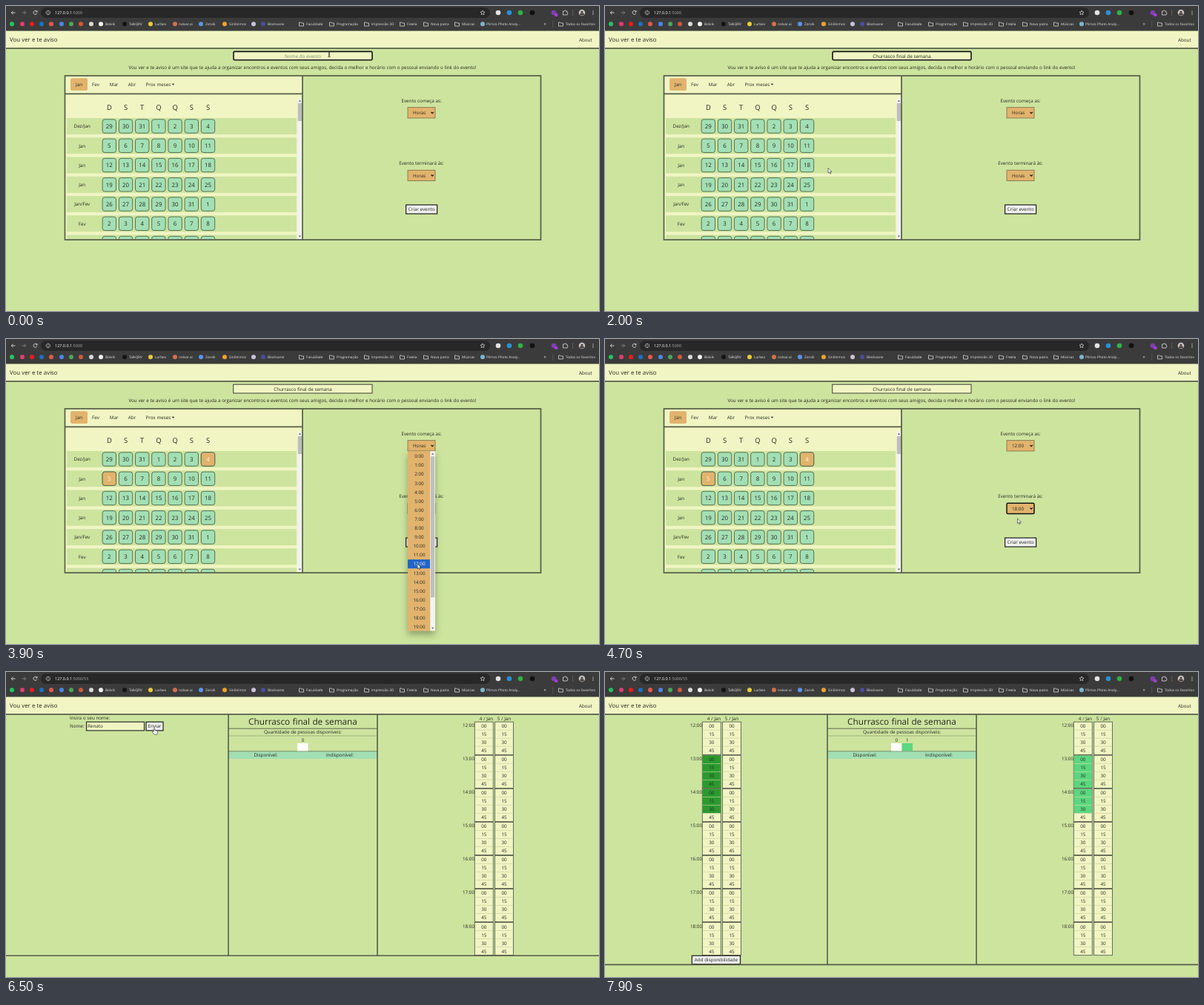
An HTML page that plays this animation: 800 px wide and 411 px high, repeating every 8 s.

```html
<!DOCTYPE html>
<html lang="pt">
<head>
<meta charset="utf-8">
<title>Vou ver e te aviso</title>
<style>
  html, body { margin: 0; width: 100%; height: 100%; overflow: hidden; background: #cde49f; }
  svg { display: block; width: 100vw; height: 100vh; }
  text { font-family: "Open Sans", "Noto Sans", sans-serif; word-spacing: .02em; text-rendering: geometricPrecision; white-space: pre; }
</style>
</head>
<body>
<svg id="stage" viewBox="0 0 800 411" xmlns="http://www.w3.org/2000/svg">
  <defs>
    <clipPath id="calendarClip"><rect x="80" y="119" width="320" height="195.5"/></clipPath>
    <filter id="shadow" x="-60%" y="-20%" width="220%" height="140%">
      <feDropShadow dx="0" dy="5" stdDeviation="5" flood-color="#3a4a20" flood-opacity=".45"/>
    </filter>
  </defs>
</svg>
<script>
const LOOP = 8000;
const CREAM = '#f0f5c3', ORANGE = '#e2b36d', MINT = '#a3dfb4', LINE = '#555d46', INK = '#25291f';
const EVENT = 'Churrasco final de semana', PERSON = 'Renato';
const stage = document.getElementById('stage');

// ---------- drawing helpers ----------
const rect = (x, y, w, h, fill, extra = '') =>
  `<rect x="${x}" y="${y}" width="${w}" height="${h}" fill="${fill}" ${extra}/>`;
const circle = (x, y, r, fill) => `<circle cx="${x}" cy="${y}" r="${r}" fill="${fill}"/>`;
const path = (d, stroke, width = 1, extra = '') =>
  `<path d="${d}" fill="none" stroke="${stroke}" stroke-width="${width}" ${extra}/>`;
const text = (x, y, s, { size = 6.67, fill = INK, anchor = 'start' } = {}) =>
  `<text x="${x}" y="${y}" font-size="${(size * .94).toFixed(2)}" fill="${fill}" text-anchor="${anchor}">${s}</text>`;
const mid = (x, y, s, style = {}) => text(x, y, s, { anchor: 'middle', ...style });
const outline = (color, width = 1, r = 0) => `stroke="${color}" stroke-width="${width}" rx="${r}"`;
const times = (n, f) => Array.from({ length: n }, (_, i) => f(i)).join('');

function group(content = '', parent = stage, attrs = '') {
  const g = document.createElementNS('http://www.w3.org/2000/svg', 'g');
  g.innerHTML = attrs ? `<g ${attrs}>${content}</g>` : content;
  parent.appendChild(g);
  return g;
}
const show = (g, on) => { g.style.display = on ? '' : 'none'; };
const setText = (g, s) => {
  const node = g.querySelector('text');
  if (node.textContent !== s) node.textContent = s;
};

// ---------- browser bars ----------
const folder = x => path(`M${x - 3} 22h2l1 1h3v4h-6z`, '#d5d5d5', .8);
const label = (x, s) => text(x, 26.2, s, { size: 5, fill: '#e6e6e6' });

function browser() {
  const icons = [[8, '#25c45e'], [22, '#e23c74'], [35, '#f01c1c'], [48, '#1b73c0'], [61, '#e35a48'],
    [75, '#4b87e8'], [88, '#4ca65a'], [101, '#cf5a3c'], [115, '#dadada'], [128, '#f2f2f2'], [160, '#141414'],
    [195, '#e6cc3c'], [228, '#d6704c'], [263, '#5c93ee'], [295, '#f0a22e'], [334, '#c9c2d8'], [347, '#4a4d9a'], [643, '#7bb6cf']];
  const links = [[134, 'Bolvik'], [166, 'TalkQRV'], [201, 'Lurbex'], [233, 'nolvar.ai'], [269, 'Zorvik'],
    [301, 'Sinônimos'], [353, 'Blockvane'], [648, 'Plimzo Photo Analy...']];
  const folders = [[405, 'Faculdade'], [446, 'Programação'], [493, 'Impressão 3D'], [541, 'Freela'],
    [573, 'Nova pasta'], [615, 'Músicas'], [755, 'Todos os favoritos']];
  const tools = [[664, '#e4e4e4'], [679, '#2b8fd6'], [694, '#2fb344'], [710, '#111'], [739, '#7d3fb0']];
  const grey = '#dcdcdc';
  return rect(0, 0, 800, 33.5, '#3b3b3b') + rect(47, 2, 606, 14, '#282828', 'rx="7"')
    + path('M12.5 9h-5m2-2.2l-2.3 2.2l2.3 2.2', grey, .9)
    + path('M21.5 9h5m-2-2.2l2.3 2.2l-2.3 2.2', '#858585', .9)
    + path('M41.6 7.4a2.5 2.5 0 1 0 .3 2.4M42 6v2h-2', grey, .9)
    + path('M56.8 6.3a2.7 2.7 0 1 0 .1 0M56.8 8.4v2.3M56.8 7.2v.7', grey, .7)
    + path('M643 6l.9 2 2.1.2-1.6 1.4.5 2.1-1.9-1.1-1.9 1.1.5-2.1-1.6-1.4 2.1-.2z', grey, .7)
    + tools.map(([x, c]) => circle(x, 9, 3.3, c)).join('') + rect(740, 10, 4.5, 4, '#a13dd0', 'rx="1"')
    + path('M751.5 7h2a1 1 0 0 1 2 0h1.5v2a1 1 0 0 1 0 2v1h-5.5z', grey, .8)
    + rect(764.5, 5, .6, 8, '#777') + circle(777, 9, 4.3, '#c9c5c0') + circle(777, 8, 1.5, '#483f3d')
    + rect(774.2, 9.6, 5.6, 3, '#483f3d', 'rx="1.4"')
    + times(3, i => circle(792, 6.8 + i * 2.2, .65, grey))
    + icons.map(([x, c]) => circle(x, 24.3, 3, c)).join('')
    + links.map(([x, s]) => label(x, s)).join('')
    + folders.map(([x, s]) => folder(x - 6.5) + label(x, s)).join('')
    + text(725.5, 26.3, '»', { size: 7, fill: grey }) + rect(737.5, 20, .6, 9, '#666');
}

function siteHeader() {
  return rect(0, 33.5, 800, 23, CREAM) + rect(0, 56.2, 800, 1.7, LINE)
    + text(5, 48.2, 'Vou ver e te aviso', { size: 8.33 }) + text(773, 47.5, 'About');
}

const button = (x, y, w, h, s) =>
  rect(x, y, w, h, '#f0f0f0', outline('#1d1d1d', 1.2)) + mid(x + w / 2, y + h / 2 + 2.3, s);

// ---------- first page: event form ----------
const dayX = i => 139.3 + 22.2 * i, weekY = i => 162 + 26.25 * i;
const dayCell = (col, row, day, fill = MINT, ink = INK) =>
  rect(dayX(col) - 9.2, weekY(row) - 9.2, 18.4, 18.4, fill, outline('#4d6650', .9, 3))
  + mid(dayX(col), weekY(row) + 2.9, day, { size: 8.33, fill: ink });

function calendar() {
  const labels = ['Dez/Jan', 'Jan', 'Jan', 'Jan', 'Jan/Fev', 'Fev', 'Fev'];
  const weeks = labels.map((s, row) => rect(82, weekY(row) - 11, 310, 22, '#cde49f')
    + mid(102.7, weekY(row) + 2.3, s)
    + times(7, col => dayCell(col, row, new Date(2024, 11, 29 + row * 7 + col).getDate()))).join('');
  return rect(80, 94, 320, 221, CREAM)
    + rect(87, 97.3, 23, 16.8, ORANGE, 'rx="2.5"')
    + [[98.5, 'Jan'], [121, 'Fev'], [145.7, 'Mar'], [170, 'Abr']].map(([x, s]) => mid(x, 108.4, s)).join('')
    + text(188.5, 108.4, 'Prox meses') + `<path d="M223.5 104.8h3.8l-1.9 2z" fill="${INK}"/>`
    + [...'DSTQQSS'].map((s, i) => mid(dayX(i), 139.6, s, { size: 10 })).join('')
    + `<g clip-path="url(#calendarClip)">${weeks}</g>`
    + rect(393.3, 124.5, 6.2, 190, '#f1f1f1') + rect(393.8, 131, 5.2, 24, '#bdbdbd')
    + `<path d="M394.8 128.8h3.2l-1.6-2zM394.8 309.4h3.2l-1.6 2z" fill="#555"/>`;
}

function formPage() {
  const frame = outline(LINE, 1.7);
  return mid(400, 85.2, 'Vou ver e te aviso é um site que te ajuda a organizar encontros e eventos com seus amigos, decida o melhor e horário com o pessoal enviando o link do evento!')
    + calendar() + rect(79.5, 94, 642, 221, 'none', frame)
    + path('M400 94V315M79.5 118.3H400', LINE, 1.7)
    + mid(560.5, 129.9, 'Evento começa as:') + mid(560.5, 214.4, 'Evento terminará às:')
    + button(539.6, 268, 42, 12, 'Criar evento');
}

const select = y => rect(542, y, 37, 14.3, ORANGE, outline('#7b6b45', .8))
  + text(549, y + 9.6, 'Horas') + path(`M573.4 ${y + 6.2}l1.7 1.8l1.7-1.8`, '#111', 1.1);

const ITEM = 12.1, POPUP_HEIGHT = 242;
function popup(top) {
  const g = group('', form);
  const box = group(rect(542, top, 37, POPUP_HEIGHT, ORANGE), g, 'filter="url(#shadow)"');
  const mark = group(rect(542, 0, 30, ITEM, '#2365c4'), g);
  const items = group(times(20, i => mid(557.5, top + .7 + (i + .5) * ITEM + 2.3, i + ':00')), g);
  group(rect(572.3, top, 6.7, POPUP_HEIGHT, '#f4f4f4') + rect(573, top + 7, 5.2, 190, '#bfbfbf')
    + `<path d="M574 ${top + 4.5}h3.2l-1.6-2zM574 ${top + 237.5}h3.2l-1.6 2z" fill="#555"/>`, g);
  return {
    update(open, y) {
      show(g, open);
      if (!open) return;
      const hover = Math.floor((y - top - .7) / ITEM);
      show(mark, hover >= 0 && hover < 20);
      mark.setAttribute('transform', `translate(0 ${top + .7 + hover * ITEM})`);
      items.querySelectorAll('text').forEach((n, i) => n.setAttribute('fill', i === hover ? '#fff' : INK));
    }
  };
}

// ---------- second page: availability ----------
const HOUR = 45.05;
const slotY = n => 67.2 + Math.floor(n / 4) * HOUR + (n % 4) * 11;
const slotLabel = n => ['00', '15', '30', '45'][n % 4];

function timetable(x) {
  const column = (cx, h) => {
    const top = 67.2 + h * HOUR;
    return rect(cx, top, 25, 44.2, CREAM, outline('#5a5f50', .9))
      + times(3, i => path(`M${cx} ${top + 11 * (i + 1)}h25`, '#8d9579', .5, 'stroke-dasharray="1 1"'))
      + times(4, i => mid(cx + 12.5, top + 11 * i + 8, slotLabel(i)));
  };
  return mid(x + 16, 64.5, '4 / Jan') + mid(x + 40, 64.5, '5 / Jan')
    + times(7, h => text(x, 74.2 + h * HOUR, 12 + h + ':00', { anchor: 'end' })
      + column(x + .3, h) + column(x + 27.5, h));
}

const filledSlot = (x, n, fill) => rect(x + .7, slotY(n) + .3, 24.2, 10.5, fill)
  + mid(x + 12.8, slotY(n) + 8, slotLabel(n));

function summary() {
  const dotted = 'stroke-dasharray="1 .8"';
  return mid(400.5, 71, EVENT, { size: 12.5 }) + mid(400.5, 83.4, 'Quantidade de pessoas disponíveis:')
    + path('M300 76.2H501', LINE, .9) + path('M300 86H501', LINE, .7, dotted)
    + rect(300, 107, 201, 10, MINT) + path('M300 106.8H501', LINE, .7)
    + mid(350.5, 114.3, 'Disponível:') + mid(450.5, 114.3, 'Indisponível:');
}
const pageLines = bottom => path(`M300 57V${bottom}M501 57V${bottom}M0 ${bottom}H800`, LINE, 1.6);

// ---------- scene ----------
group(rect(0, 0, 800, 411, '#cde49f') + siteHeader());

const form = group(formPage());
const titleFocus = group(rect(307, 61.4, 187, 11.4, CREAM, outline('#151515', 1.6, 1.5)), form);
const titlePlain = group(rect(306.7, 61.2, 187.3, 11.8, CREAM, outline('#3e4138', 1)), form);
const titleText = group(mid(400.5, 69.6, ''), form);
const startSelect = group(select(136.7), form);
const endSelect = group(select(221.2), form);
const day4 = group(dayCell(6, 0, 4, ORANGE, '#fff8e4'), form);
const day5 = group(dayCell(0, 1, 5, ORANGE, '#fff8e4'), form);

const event = group(summary() + timetable(632));
const nameForm = group(text(86, 64.4, 'Insira o seu nome:') + text(86, 75.4, 'Nome:')
  + rect(108.5, 67.3, 78, 11.6, CREAM, outline('#30332b', 1.2))
  + button(189, 67.3, 23, 11.6, 'Enviar') + pageLines(382.3), event);
const nameText = group(text(110, 75.4, ''), event);
const ownTable = group(timetable(131) + button(117.3, 382.3, 65.2, 11.4, 'Add disponibilidade') + pageLines(394.4), event);
const ownSlots = Array.from({ length: 7 }, (_, i) => group(filledSlot(131, i + 4, '#2b9a2f'), event));
const legendEmpty = group(mid(400.5, 93.8, '0') + rect(393, 96, 14.5, 10.4, '#fff'), event);
const legendOne = group(mid(393.2, 93.8, '0') + mid(407.8, 93.8, '1')
  + rect(386, 96, 14.5, 10.4, '#fff') + rect(400.5, 96, 14.5, 10.4, '#5cd67f')
  + times(7, i => filledSlot(632, i + 4, '#5cd67f')), event);

const bars = group(browser());
const url = group(`<text x="66" y="11.3" font-size="5.48" fill="#fff">127.0.0.1<tspan fill="#aaa"></tspan></text>`);
const urlTail = url.querySelector('tspan');

// The lists open above every other part, including the browser bars.
stage.appendChild(form);
const startPopup = popup(151.2), endPopup = popup(-21.2);

const pointers = {
  beam: group(path('M-1.6-3.6q1.6 0 1.6 1v5.2q0 1-1.6 1M1.6-3.6q-1.6 0-1.6 1v5.2q0 1 1.6 1', '#222', .8)),
  arrow: group('<path d="M0 0V6.6L1.6 5.2L2.7 7.6L3.8 7.1L2.8 4.8H4.9Z" fill="#fff" stroke="#222" stroke-width=".6"/>'),
  hand: group('<path d="M-.8 4.5V.6q.8-1 1.6 0V3l3 .8q.8.3.6 1.5l-.5 3.4H.2L-2.4 5.8q-.2-1.1.8-.8z" fill="#fff" stroke="#222" stroke-width=".6"/>')
};

// ---------- timeline ----------
// time, x, y of the pointer tip
const route = [[0, 436, 65], [1500, 436, 65], [1950, 301, 218.5], [2050, 301, 218.5], [2250, 275, 163],
  [2350, 275, 163], [2550, 140, 189], [2620, 140, 189], [2850, 560, 144], [2920, 560, 144], [3100, 557, 234.5],
  [3400, 556, 262], [3900, 555, 303], [4020, 555, 303], [4200, 559, 228], [4260, 559, 228], [4450, 558, 202],
  [4520, 558, 202], [4700, 556.5, 242], [4950, 560, 274], [5300, 560, 274], [5600, 146, 73], [6200, 146, 73],
  [6400, 200, 75.5], [6600, 200, 75.5], [6850, 143, 115], [6900, 143, 115], [7450, 143, 185], [7700, 150, 387], [8000, 150, 387]];

function pointerAt(t) {
  const i = route.findIndex(([time]) => time > t);
  const [t0, x0, y0] = route[i - 1], [t1, x1, y1] = route[i];
  const p = (t - t0) / (t1 - t0), e = p * p * (3 - 2 * p);
  return [x0 + (x1 - x0) * e, y0 + (y1 - y0) * e];
}

const typed = (s, t, from, to) =>
  s.slice(0, Math.max(0, Math.floor((t - from) / (to - from) * s.length)));

function pointerKind(t) {
  if (t < 1560 || (t > 5560 && t < 6260)) return 'beam';
  if ((t > 2200 && t < 2640) || (t > 4900 && t < 5200) || (t > 6360 && t < 6620) || t > 7660) return 'hand';
  return 'arrow';
}

function draw(t) {
  const [x, y] = pointerAt(t);
  const onEvent = t >= 5200;
  show(form, !onEvent);
  show(event, onEvent);
  urlTail.textContent = onEvent ? ':5000/55' : ':5000';

  const title = typed(EVENT, t, 150, 1500);
  setText(titleText, title || 'Nome do evento');
  titleText.querySelector('text').setAttribute('fill', title ? INK : '#8a8d76');
  show(titleFocus, t < 2300);
  show(titlePlain, t >= 2300);
  show(day4, t >= 2300);
  show(day5, t >= 2580);

  setText(startSelect, t >= 4020 ? '12:00' : 'Horas');
  setText(endSelect, t >= 4500 ? '18:00' : 'Horas');
  const ring = endSelect.querySelector('rect');
  ring.setAttribute('stroke', t >= 4230 ? '#151515' : '#7b6b45');
  ring.setAttribute('stroke-width', t >= 4230 ? 1.5 : .8);
  ring.setAttribute('rx', t >= 4230 ? 1.5 : 0);
  startPopup.update(t >= 2900 && t < 4020, y);
  endPopup.update(t >= 4240 && t < 4500, y);

  const sent = t >= 6600, added = t >= 7800;
  show(nameForm, !sent);
  show(nameText, !sent);
  setText(nameText, typed(PERSON, t, 5700, 6150));
  show(ownTable, sent);
  const filled = t < 6880 ? 0 : Math.floor((y - 112) / 11.25) + 1;
  ownSlots.forEach((slot, i) => show(slot, i < filled));
  show(legendEmpty, !added);
  show(legendOne, added);

  const kind = t >= 7850 ? '' : pointerKind(t);
  for (const [name, g] of Object.entries(pointers)) {
    show(g, name === kind);
    g.setAttribute('transform', `translate(${x.toFixed(2)} ${y.toFixed(2)})`);
  }
}

const begin = performance.now();
function tick() {
  draw((performance.now() - begin) % LOOP);
  requestAnimationFrame(tick);
}
tick();
</script>
</body>
</html>
```
